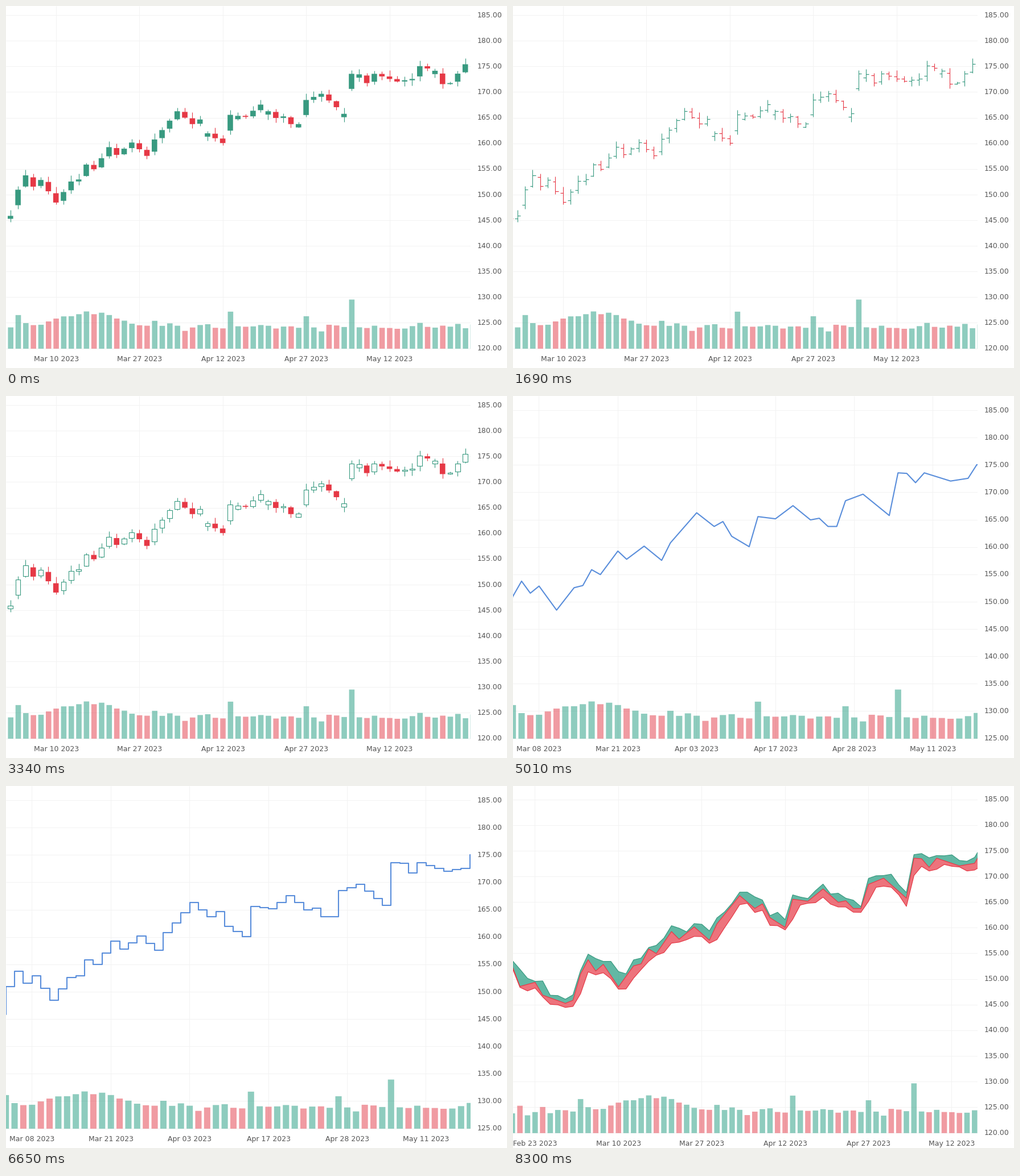
Recreate the animation shown at these times as a matplotlib script. Size 880x637 px, loop 9.89 s.

```python
import numpy as np
import matplotlib.pyplot as plt
from matplotlib.animation import FuncAnimation
from matplotlib.collections import LineCollection, PolyCollection
from matplotlib.patches import Rectangle

W, H, DPI = 880, 637, 80
PX = 72 / DPI          # points per pixel
RIGHT = 816            # right edge of the plot
STEP, FRAMES = 23, 430
CUTS = [1690, 3340, 5010, 6650, 8300]

UP, DOWN, BLUE = "#389a80", "#e63845", "#5a8edb"
VOL_UP, VOL_DOWN = "#1f9a7e", "#e23846"
GRID, INK = "#f2f2f2", "#555555"

# Turning points of the closing price: trading day, price
TURNS = [
    (0, 152.5), (1, 148.6), (3, 149.4), (4, 146.9), (7, 145.3), (8, 145.9),
    (9, 151), (10, 153.8), (11, 151.6), (12, 152.9), (14, 148.5),
    (16, 152.6), (17, 153), (18, 155.9), (19, 155), (21, 159.3),
    (22, 157.8), (24, 160.2), (26, 157.6), (27, 160.8), (30, 166.3),
    (32, 163.8), (33, 164.7), (34, 162), (36, 160.1), (37, 165.6),
    (39, 165.2), (41, 167.6), (43, 165), (44, 165.3), (45, 163.8),
    (46, 163.8), (47, 168.5), (49, 169.7), (52, 165.8), (53, 173.6),
    (54, 173.5), (55, 171.8), (56, 173.6), (59, 172.1), (61, 172.6),
    (62, 175.1), (64, 174.2), (65, 171.6), (66, 171.8), (69, 177.3)]
REBOUNDS = [5, 6, 34, 38, 42, 46, 52, 54, 64]   # opened low, then rose

rng = np.random.default_rng(4)
DAYS = np.arange(70)
DATES = np.busday_offset("2023-02-17", DAYS,
                         holidays=["2023-02-20", "2023-04-07"])
CLOSE = np.interp(DAYS, *zip(*TURNS))
MOVE = np.diff(CLOSE, prepend=CLOSE[0])
# The bigger the move, the more of it happens overnight
OPEN = CLOSE - MOVE * (1 - 0.08 * abs(MOVE))
OPEN[REBOUNDS] = CLOSE[REBOUNDS] - 0.65
HIGH = np.maximum(OPEN, CLOSE) + rng.uniform(0.1, 1.2, 70)
LOW = np.minimum(OPEN, CLOSE) - rng.uniform(0.1, 1.1, 70)
# Volume follows the size of the move, with a busy spell in mid-March
VOLUME = (47 + 1.05 * MOVE ** 2 + 30 * np.exp(-((DAYS - 18.5) / 5) ** 2)
          + rng.normal(0, 3, 70))
RISE = CLOSE >= OPEN

fig = plt.figure(figsize=(W / DPI, H / DPI), dpi=DPI, facecolor="white")
ax = fig.add_axes([0, 0, 1, 1])
ax.axis("off")
ax.set_xlim(0, W)
ax.set_ylim(H, 0)
ax.autoscale(False)


def box(x, y1, y2, half):
    return [(x - half, y1), (x + half, y1), (x + half, y2), (x - half, y2)]


def pick(up, down):
    return [up if r else down for r in RISE]


class Chart:
    """One view: grid, labels and volume bars, with prices added on top."""

    def __init__(self, base, floor, scale, day0, x0, gap, every):
        self.art = []
        self.base, self.gap = base, gap
        self.x = x0 + (DAYS - day0) * gap
        self.y = lambda p: base - (p - floor) * scale
        self.clip = Rectangle((0, 0), RIGHT, base + 1, transform=ax.transData)
        self.grid(floor, DAYS[day0 % every::every])
        self.volume()

    def keep(self, art):
        art.set_clip_path(self.clip)
        art.set_zorder(2)
        self.art.append(art)

    def segments(self, segs, colors, width=1):
        # Snapping rounds up, so step back to stay on the same pixel
        lines = LineCollection(np.array(segs) - 0.45, colors=colors,
                               linewidths=width * PX)
        lines.set_snap(True)
        ax.add_collection(lines, autolim=False)
        self.keep(lines)

    def boxes(self, verts, face, edge="none", alpha=None):
        outlined = edge != "none"
        polys = PolyCollection(np.array(verts) - 0.45 * outlined,
                               facecolors=face, edgecolors=edge, alpha=alpha,
                               linewidths=1.1 * PX * outlined)
        polys.set_snap(outlined)
        ax.add_collection(polys, autolim=False)
        self.keep(polys)

    def label(self, x, y, text, ha):
        self.art.append(ax.text(x, y, text, ha=ha, va="baseline", color=INK,
                                family="DejaVu Sans", size=12.5 * PX))

    def grid(self, floor, ticks):
        segs = []
        for p in range(floor, 190, 5):
            y = self.y(p)
            segs.append([(0, y), (RIGHT, y)])
            self.label(827.5, y + 3.2, f"{p:.2f}", "left")
        for day in ticks:
            x = self.x[day]
            if 0 < x < RIGHT:
                segs.append([(x, 0), (x, self.base)])
                date = DATES[day].astype(object).strftime("%b %d %Y")
                self.label(x, self.base + 22, date, "center")
        self.segments(segs, GRID)

    def volume(self):
        tops = self.base - VOLUME * self.base * 0.001306
        half = self.gap * 0.36
        self.boxes([box(x, t, self.base, half) for x, t in zip(self.x, tops)],
                   pick(VOL_UP, VOL_DOWN), alpha=0.5)

    def wicks(self):
        self.segments([[(x, self.y(h)), (x, self.y(l))]
                       for x, h, l in zip(self.x, HIGH, LOW)],
                      pick(UP, DOWN), 1.1)

    def candles(self, hollow):
        self.wicks()
        solid, colors, frames = [], [], []
        for x, o, c in zip(self.x[:-1], OPEN, CLOSE):
            y1, y2 = self.y(max(o, c)), self.y(min(o, c))
            if hollow and c > o:
                frames.append(box(x, y1, y2, 4.4))
            else:
                solid.append(box(x - 0.4, y1, y2, 4.8))
                colors.append(UP if c >= o else DOWN)
        self.boxes(solid, colors)
        if frames:
            self.boxes(frames, "white", UP)
        return self

    def ohlc(self):
        self.wicks()
        segs, colors = [], []
        for x, o, c, color in zip(self.x[:-1], OPEN, CLOSE, pick(UP, DOWN)):
            segs += [[(x - 4.8, self.y(o)), (x, self.y(o))],
                     [(x, self.y(c)), (x + 5.2, self.y(c))]]
            colors += [color, color]
        self.segments(segs, colors, 1.2)
        return self

    def line(self, prices, color, width, style="default"):
        self.keep(ax.plot(self.x, self.y(prices), color=color, lw=width * PX,
                          drawstyle=style, solid_joinstyle="round")[0])
        return self

    def bands(self):
        for a, b, color in ((HIGH, CLOSE, VOL_UP), (CLOSE, LOW, DOWN)):
            self.keep(ax.fill_between(self.x, self.y(a), self.y(b), lw=0,
                                      color=color, alpha=0.7))
        self.line(HIGH, UP, 1.2).line(LOW, DOWN, 1.2)
        return self.line(CLOSE, DOWN, 1.2)


wide = (603, 120, 9.023, 14, 88.1, 13.315, 11)
near = (603, 125, 9.625, 12, 45.8, 15.378, 9)
late = (610.8, 120, 9.026, 3, 38.8, 13.31, 11)

scenes = [
    Chart(*wide).candles(hollow=False),
    Chart(*wide).ohlc(),
    Chart(*wide).candles(hollow=True),
    Chart(*near).line(CLOSE, BLUE, 2.1),
    Chart(*near).line(CLOSE, BLUE, 2.1, "steps-post"),
    Chart(*late).bands(),
]


def update(i):
    now = sum(i >= cut // STEP for cut in CUTS)
    for n, scene in enumerate(scenes):
        for art in scene.art:
            art.set_visible(n == now)
    return []


anim = FuncAnimation(fig, update, frames=FRAMES, interval=STEP,
                     init_func=lambda: update(0), repeat=True, repeat_delay=0)
plt.show()
```
